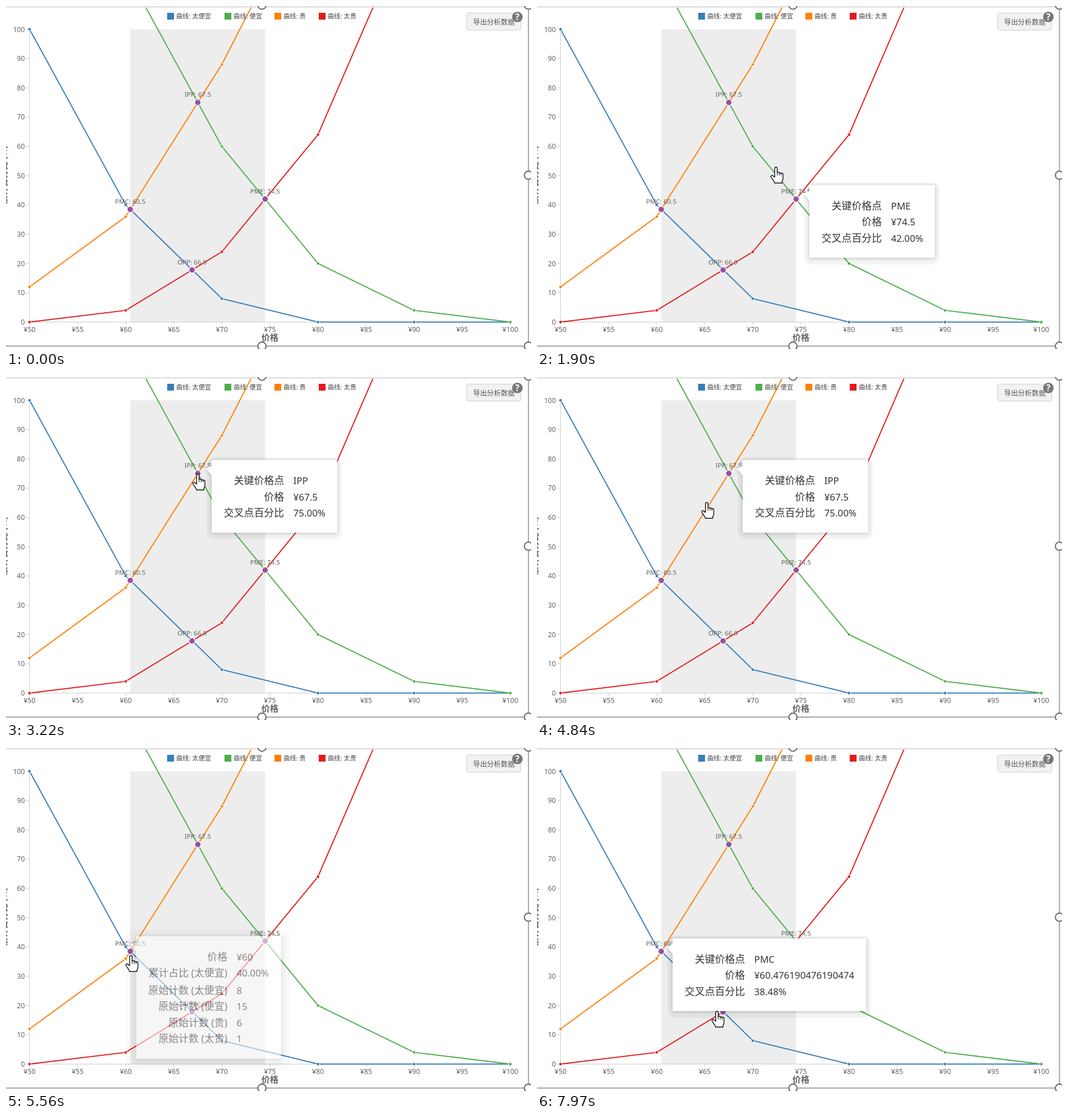
These frames come from a looping animation (925 by 605 pixels, 8 s). An HTML page:

```html
<!DOCTYPE html>
<html lang="zh-CN">
<head>
<meta charset="utf-8">
<style>
html, body { margin: 0; width: 925px; height: 605px; overflow: hidden; background: #fff; }
svg { display: block; font-family: 'Noto Sans', 'Noto Sans CJK SC', 'Noto Sans CJK', sans-serif; }
.end { text-anchor: end; }
.mid { text-anchor: middle; }
</style>
</head>
<body>
<svg id="stage" width="925" height="605" viewBox="0 0 925 605">
  <defs>
    <clipPath id="plot"><rect y="3" width="919" height="600"/></clipPath>
    <filter id="soft" x="-20%" y="-20%" width="140%" height="140%">
      <feDropShadow dx="0" dy="1" stdDeviation="3" flood-opacity=".22"/>
    </filter>
  </defs>
  <g id="chart"></g>
  <g id="tips"></g>
  <g id="cursor" stroke="#111" stroke-width="1.4" fill="#fff" stroke-linejoin="round">
    <g id="hand">
      <path d="M-2.2 18V2.4a2.2 2.2 0 0 1 4.4 0V10a2 2 0 0 1 3.6.4v.6a1.9 1.9 0 0 1 3.4.6v.6a1.7 1.7 0 0 1 3.3.8V20c0 3-2 4-2 8.3H-2.2C-3 24-9 19-8.8 16.5c.3-2 3.2-2 4.4-.5z"/>
      <path d="M2.2 10v5M5.8 11v4M9.2 12v3" stroke-width="1"/>
    </g>
    <path id="arrow" d="M0 0V20L4.7 15.6 7.8 23 11 21.6 8 14.4H14.2z"/>
  </g>
</svg>
<script>
const $ = id => document.getElementById(id);
const SVG = 'http://www.w3.org/2000/svg';

function add(parent, tag, attrs, text) {
  const el = document.createElementNS(SVG, tag);
  for (const k in attrs) el.setAttribute(k, attrs[k]);
  if (text) el.textContent = text;
  parent.append(el);
  return el;
}

const chart = $('chart');
const px = v => 41.5 + (v - 50) * 16.94;
const py = v => 557.5 - v * 5.165;
const line = (d, stroke, width = 1) => add(chart, 'path', { d, stroke, 'stroke-width': width, fill: 'none' });
const label = (x, y, size, text, more = {}) =>
  add(chart, 'text', { x, y, 'font-size': size, fill: '#626262', ...more }, text);
const dot = (x, y, r, fill, stroke = '#fff', width = 1) =>
  add(chart, 'circle', { cx: x, cy: y, r, fill, stroke, 'stroke-width': width });

const series = [
  { name: '太便宜', color: '#377eb8', x: 284, data: [100, 40, 8, 0, 0, 0] },
  { name: '便宜', color: '#4daf4a', x: 385, data: [, 120, 60, 20, 4, 0] },
  { name: '贵', color: '#ff7f00', x: 473, data: [12, 36, 88, 152] },
  { name: '太贵', color: '#e41a1c', x: 551, data: [0, 4, 24, 64, 140] }
];
const marks = [
  ['PMC', 60.476, 38.48], ['IPP', 67.5, 75], ['OPP', 66.9, 17.8], ['PME', 74.5, 42]
];

function drawChart() {
  add(chart, 'rect', { x: 219, y: 41, width: 237.5, height: 516.5, fill: '#ededed' });
  line('M41.5 41V557.5H888.5', '#ccc');
  for (let v = 0; v <= 100; v += 10) {
    line(`M35.5 ${py(v)}h6`, '#ccc');
    label(33.3, py(v) + 4.5, 12.2, String(v), { class: 'end' });
  }
  for (let v = 50; v <= 100; v += 5) {
    line(`M${px(v)} 557.5v5`, '#ccc');
    label(px(v), 574.6, 12.2, '¥' + v, { class: 'mid' });
  }
  const bold = { class: 'mid', 'font-weight': 700 };
  label(465, 590, 15, '价格', bold);
  label(0, 0, 15, '累计百分比 (%)', { ...bold, transform: 'translate(1 298) rotate(-90)' });

  for (const { color, data } of series) {
    const pts = data.map((v, i) => [px(50 + i * 10), py(v)]).filter(Boolean);
    const path = line('M' + pts.map(p => p.join(' ')).join('L'), color, 1.9);
    path.setAttribute('clip-path', 'url(#plot)');
    for (const [x, y] of pts) if (y > 3) dot(x, y, 2.8, color);
  }
  for (const [name, x, y] of marks) {
    dot(px(x), py(y), 5.5, '#984ea3', '#fff', 1.4);
    label(px(x), py(y) - 10, 11.5, `${name}: ${x.toFixed(1)}`, { class: 'mid' });
  }
  for (const { name, color, x } of series) {
    add(chart, 'rect', { x, y: 12, width: 12, height: 12, fill: color });
    label(x + 16, 22.2, 11.1, '曲线: ' + name, { fill: '#444' });
  }

  // Export button and help badge
  add(chart, 'rect', { x: 811.5, y: 12.5, width: 95.5, height: 30, rx: 3, fill: '#f2f2f2', stroke: '#cfcfcf' });
  label(823, 32.7, 12.2, '导出分析数据', { fill: '#555' });
  dot(901, 19.3, 9.3, '#787878', 'none');
  label(901, 25, 15.5, '?', { ...bold, fill: '#fff' });

  // Selection frame with handles
  line('M0 1.5H920', '#d9d9d9', 2);
  line('M920.5 0V600', '#8a8a8a', 1.5);
  line('M0 599.8H920', '#8a8a8a', 1.5);
  for (const [x, y] of [[451, -1.5], [920.5, -1.5], [920.5, 298.5], [451, 600], [920.5, 600]])
    dot(x, y, 7.2, '#fff', '#666', 2);
}

function makeTip({ x, y, w, h, split, rows, halo = 0 }) {
  const g = add($('tips'), 'g', { transform: `translate(${x} ${y})` });
  const glow = grow => add(g, 'rect', {
    x: -9 - grow, y: -4 - grow, width: w + 17 + 2 * grow, height: h + 16 + 2 * grow, rx: 14, fill: 'rgba(0,0,0,.043)'
  });
  if (halo) glow(halo);
  glow(0);
  add(g, 'path', {
    d: `M0 0H${w}V${h}H0V27L-10 15 0 10z`, fill: '#fff', filter: 'url(#soft)'
  });
  rows.forEach(([key, value], i) => {
    const base = 42.6 + i * 28.5 + (rows.length > 3 && i > 1 ? 2 : 0);
    add(g, 'text', { x: split, y: base, class: 'end', 'font-size': 17.7, fill: '#333' }, key);
    add(g, 'text', { x: split + 16.3, y: base, 'font-size': 16.7, fill: '#333' }, value);
  });
  return g;
}

const markRows = (name, price, share) => [['关键价格点', name], ['价格', '¥' + price], ['交叉点百分比', share]];
// Each tooltip appears at `from` and fades out between the two `out` times.
const tips = [
  { x: 480, y: 316, w: 221, h: 128, split: 127.5, from: 1090, out: [1930, 2110], rows: markRows('PME', '74.5', '42.00%') },
  { x: 362.5, y: 146.5, w: 221, h: 128, split: 127.5, from: 3220, out: [4870, 5050], rows: markRows('IPP', '67.5', '75.00%') },
  { x: 229.5, y: 332, w: 255, h: 216, split: 160.5, from: 5260, out: [5470, 5670], halo: 8, rows: [
    ['价格', '¥60'], ['累计占比 (太便宜)', '40.00%'], ['原始计数 (太便宜)', '8'],
    ['原始计数 (便宜)', '15'], ['原始计数 (贵)', '6'], ['原始计数 (太贵)', '1']] },
  { x: 239, y: 336, w: 341, h: 128, split: 127.5, from: 6730, out: [9000, 9100], rows: markRows('PMC', '60.476190476190474', '38.48%') }
];

// Pointer keys: time, x, y of the tip
const keys = [
  [120, 915, 575], [300, 690, 440], [540, 480, 352], [720, 456, 343],
  [1840, 456, 343], [1900, 421, 284], [2020, 378, 222], [2260, 350, 184], [2620, 342, 166],
  [2680, 342, 166], [3160, 338, 171],
  [4780, 338, 171], [4840, 299, 221], [4960, 238, 312], [5080, 200, 351], [5200, 208, 352],
  [5440, 215, 360], [5560, 220, 366], [5620, 220, 366], [5800, 221, 349],
  [6300, 221, 349], [6420, 215, 358], [7720, 215, 358], [7960, 317, 464], [8000, 317, 464]
];

const clamp = v => Math.max(0, Math.min(1, v));

function pointer(t) {
  const i = Math.max(1, keys.findIndex(k => k[0] > t));
  const [t0, x0, y0] = keys[i - 1], [t1, x1, y1] = keys[i];
  const p = clamp((t - t0) / (t1 - t0));
  return [x0 + (x1 - x0) * p, y0 + (y1 - y0) * p];
}

function show(t) {
  const step = Math.floor((t - 40) / 60) * 60 + 40;
  for (const tip of tips) {
    const [a, b] = tip.out;
    const alpha = t < tip.from ? 0 : clamp((b - step) / (b - a));
    tip.el.setAttribute('opacity', alpha);
  }
  const [x, y] = pointer(step);
  $('cursor').setAttribute('transform', `translate(${x} ${y})`);
  $('cursor').style.display = t < 120 ? 'none' : '';
  $('hand').style.display = t < 640 ? 'none' : '';
  $('arrow').style.display = t < 640 ? '' : 'none';
}

drawChart();
for (const tip of tips) tip.el = makeTip(tip);
const start = performance.now();
function tick() {
  show((performance.now() - start) % 8000);
  requestAnimationFrame(tick);
}
show(0);
tick();
</script>
</body>
</html>
```
